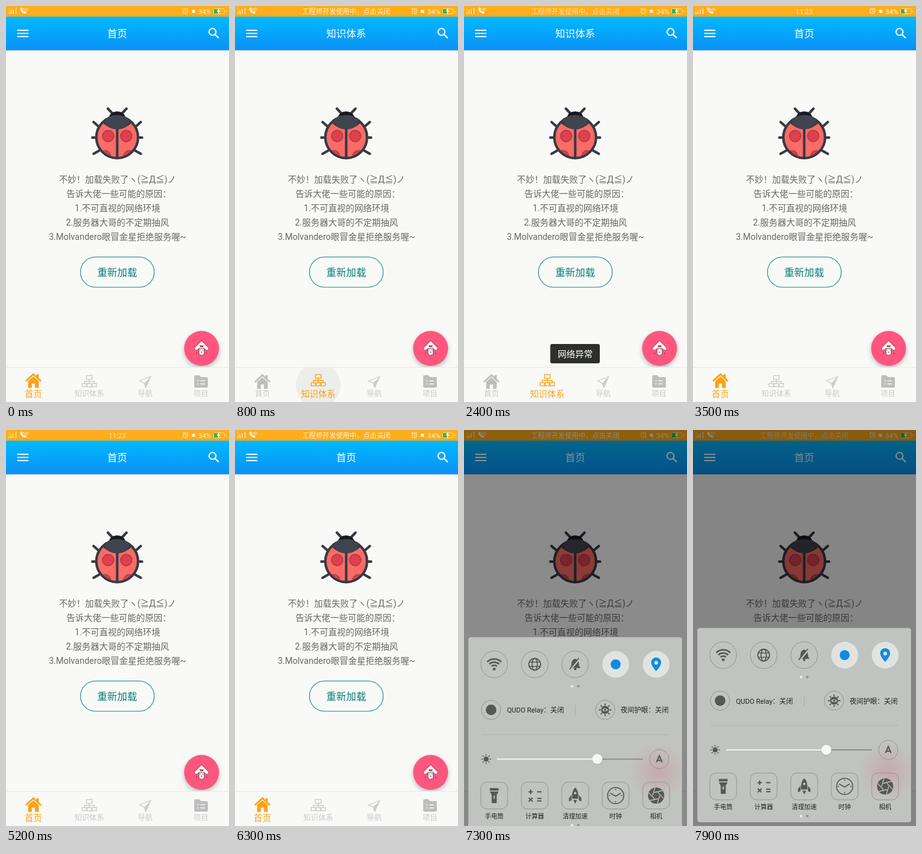
An HTML page with a canvas that plays this animation: 358x635 px, repeating every 8 s.

```html
<!DOCTYPE html>
<html lang="zh-CN">
<head>
<meta charset="utf-8">
<style>
html, body { margin: 0; width: 100%; height: 100%; overflow: hidden; background: #f9faf8; }
canvas { display: block; width: 358px; height: 635px; }
</style>
</head>
<body>
<canvas id="stage"></canvas>
<script>
const W = 358, H = 635, LOOP = 8000;
const FONT = 'Roboto, "Noto Sans CJK SC", "Noto Sans CJK", sans-serif';
const PAGE = '#f9faf8', DARK = '#363a44', INK = '#555855', BLUE = '#0f8be2', PANEL = '#c1c3c0';
const canvas = document.getElementById('stage');
const dpr = window.devicePixelRatio || 1;
canvas.width = W * dpr;
canvas.height = H * dpr;
const c = canvas.getContext('2d');

const clamp = x => Math.min(1, Math.max(0, x));
const ramp = (t, from, to) => clamp((t - from) / (to - from));
const ease = x => x * x * (3 - 2 * x);
const mix = (a, b, k) => `rgb(${a.map((v, i) => Math.round(v + (b[i] - v) * k))})`;

function text(str, x, mid, size, color, align = 'center') {
  c.font = `${size}px ${FONT}`;
  c.textAlign = align;
  c.fillStyle = color;
  c.fillText(str, x, mid + size * 0.37);
}
function at(x, y, draw) {
  c.save();
  c.translate(x, y);
  draw();
  c.restore();
}
function fade(alpha, draw) {
  if (alpha <= 0) return;
  c.save();
  c.globalAlpha = alpha;
  draw();
  c.restore();
}
function rect(x, y, w, h, color) {
  c.fillStyle = color;
  c.fillRect(x, y, w, h);
}
function paint(fill, stroke, width = 1) {
  if (fill) { c.fillStyle = fill; c.fill(); }
  if (stroke) { c.strokeStyle = stroke; c.lineWidth = width; c.stroke(); }
}
function disc(x, y, r, fill, stroke, width) {
  c.beginPath();
  c.arc(x, y, r, 0, 7);
  paint(fill, stroke, width);
}
function box(x, y, w, h, r, fill, stroke, width) {
  c.beginPath();
  c.roundRect(x, y, w, h, r);
  paint(fill, stroke, width);
}
function shape(d, fill, stroke, width = 1) {
  const p = new Path2D(d);
  if (fill) { c.fillStyle = fill; c.fill(p); }
  if (stroke) { c.strokeStyle = stroke; c.lineWidth = width; c.stroke(p); }
}

function statusBar(t) {
  rect(0, 0, W, 17, '#ffad1a');
  const ink = '#fff3dc';
  shape('M5 4v1M5 7v1M5 10v3M8 7v6M11.5 5v8M16 3v10', null, ink, 1.2);
  shape('M23 4q-1 3 3 6t6 2l1-2-3-2-1 1q-2-1-3-3l1-1-2-3z', ink);
  text('HD', 31.5, 6, 6.5, ink);
  disc(288, 8.5, 3.9, null, ink, 1);
  shape('M288 6v3h2M283.5 5l2.5-2M292.5 5l-2.5-2', null, ink, 1);
  rect(298.5, 6, 5, 5, ink);
  text('34%', 319, 8.5, 11, ink);
  box(333.5, 4.5, 17, 8, 2, null, '#ffdc9a', 1);
  rect(334, 5, 6, 7, '#19b866');
  shape('M341 4l-2.5 5h2.5l-1 4 4-5.5h-2.5l1-3.500z', '#fff');
  rect(352, 7.5, 1.5, 2, ink);

  const notice = ramp(t, 300, 800) - ramp(t, 2300, 2700) + ramp(t, 5800, 6300) - ramp(t, 7800, 8200);
  const clock = ramp(t, 3000, 3500) - ramp(t, 5100, 5500);
  fade(notice, () => text('工程师开发使用中，点击关闭', 178.5, 8.5, 10.9, ink));
  fade(clock, () => text('11:23', 178.5, 8.5, 11, ink));
}

function header(title) {
  const g = c.createLinearGradient(0, 17, 0, 71);
  g.addColorStop(0, '#00b9ff');
  g.addColorStop(1, '#0b91f5');
  rect(0, 17, W, 54, g);
  rect(0, 71, W, 1, '#e3e8ec');
  for (const y of [38, 43, 48]) rect(18, y, 18, 2, '#fff');
  disc(331.5, 41.5, 5.5, null, '#fff', 2);
  shape('M335.500 45.500l6 6', null, '#fff', 2.4);
  text(title, 178.5, 44, 16, '#fff');
}

function ladybug() {
  at(178.5, 0, () => {
    c.lineCap = 'round';
    for (const side of [-1, 1]) {
      c.save();
      c.scale(side, 1);
      shape('M6 174L15 164.500M29 194L38 186M35 211h5M29 232l9 5', null, DARK, 4);
      c.restore();
    }
    shape('M-14 180q3-11 14-11t14 11z', '#17191d');
    disc(0, 210.5, 33.5, '#fd6b66');
    c.save();
    c.beginPath();
    c.arc(0, 210.5, 33.5, 0, 7);
    c.clip();
    for (const side of [-1, 1]) {
      disc(side * 14.5, 208.5, 9, '#e23f4c', '#a9414b', 1.8);
      disc(side * 19.5, 241, 9, '#d9424c', '#a9414b', 1.8);
    }
    shape('M-25 186Q-12 198 0 198T25 186L20 174H-20z', DARK);
    c.restore();
    shape('M0 197V243', null, DARK, 4);
    disc(0, 210.5, 33.5, null, DARK, 4);
    shape('M-20 185Q-15 175 0 175T20 185Q14 197 0 197T-20 185z', '#40444e');
  });
}

function errorPage() {
  ladybug();
  const lines = [
    '不妙！加载失败了ヽ(≧Д≦)ノ', '告诉大佬一些可能的原因：', '1.不可直视的网络环境',
    '2.服务器大哥的不定期抽风', '3.Molvandero眼冒金星拒绝服务喔~'
  ];
  lines.forEach((s, i) => text(s, i === 1 ? 181 : 179, 278 + 23 * i, 14, '#666866'));
  box(119.5, 402.5, 118.5, 48.5, 24.25, null, '#148a84', 1.1);
  text('重新加载', 178.5, 427, 16, '#087f78');
}

function fab() {
  c.save();
  c.shadowColor = 'rgba(0,0,0,.28)';
  c.shadowBlur = 7 * dpr;
  c.shadowOffsetY = 3 * dpr;
  disc(314, 549, 28, '#ff5680');
  c.restore();
  at(314, 549, () => {
    c.lineJoin = 'round';
    shape('M-4 0h8v9q-4 4-8 0z', '#fff', '#5b4a50', 0.8);
    shape('M0-12L11-1q1 4-3 4l-4-3h-8l-4 3q-4 0-3-4z', '#fff', '#6b5058', 0.8);
    rect(-3, -5, 6, 3, '#d94c4c');
    shape('M-2 2v1M2 2v1M-1.500 6h3', null, '#4a3c40', 1.1);
    disc(-8, 8, 1, '#a52f50');
    disc(8, 8, 1, '#a52f50');
  });
}

const tabIcons = [
  color => {
    shape('M-12 1L0-10 12 1', null, color, 2.8);
    shape('M-8.500 1L0-6.500 8.500 1V12H2.500V5h-5v7h-6z', color);
    rect(5, -10, 3.5, 6, color);
  },
  color => {
    c.strokeStyle = color;
    c.lineWidth = 1.3;
    c.strokeRect(-4.5, -9.5, 9, 6);
    for (const x of [-11.5, -3.5, 4.5]) c.strokeRect(x, 3.5, 7, 5);
    shape('M0-3.500V3.500M-8 3.500V0H8V3.500', null, color, 1.3);
  },
  color => {
    shape('M-9-1L9-8 1 10-1.500 3z', null, color, 1.2);
    shape('M9-8L-1.500 3 1 10z', color);
  },
  color => {
    shape('M-11-8q0-2 2-2h6l3 3h9q2 0 2 2V8q0 2-2 2H-9q-2 0-2-2z', color);
    shape('M-6-1h2M-1-1h7M-6 4h2M-1 4h7', null, '#f6f6f5', 1.6);
  }
];

function navBar(t, tree) {
  rect(0, 579, W, 1, '#e9eae8');
  rect(0, 580, W, 55, '#f9f9f8');
  c.save();
  c.beginPath();
  c.rect(0, 580, W, 55);
  c.clip();
  for (const [x, tap] of [[133.5, 450], [44, 2650]]) {
    const alpha = ramp(t, tap, tap + 100) * (1 - ramp(t, tap + 250, tap + 750));
    fade(alpha * 0.06, () => disc(x, 608, 12 + 24 * ease(ramp(t, tap, tap + 300)), '#000'));
  }
  c.restore();
  ['首页', '知识体系', '导航', '项目'].forEach((name, i) => {
    const on = [1 - tree, tree, 0, 0][i];
    const x = 44 + 89.7 * i;
    const orange = [250, 162, 24];
    const grey = i === 0 || i === 3 ? 190 : 203;
    at(x, 602 - 1.5 * on, () => tabIcons[i](mix([grey, grey, grey], orange, on)));
    text(name, x, 622 - 0.5 * on, 12 + 1.9 * on, mix([200, 200, 200], orange, on));
  });
}

function toast(t) {
  fade(ramp(t, 950, 1300) - ramp(t, 2850, 3200), () => {
    box(138.5, 542, 79.5, 31, 3, '#2d2f2d');
    text('网络异常', 178.5, 558, 14, '#fff');
  });
}

const toggles = [
  () => {
    disc(0, 7.5, 2.3, INK);
    for (const r of [6, 11, 16]) {
      c.beginPath();
      c.arc(0, 7.5, r, -Math.PI * 0.75, -Math.PI * 0.25);
      paint(null, INK, 2.6);
    }
  },
  () => {
    disc(0, 0, 9.5, null, INK, 1.8);
    c.beginPath();
    c.ellipse(0, 0, 4.2, 9.5, 0, 0, 7);
    paint(null, INK, 1.6);
    shape('M-9-3.500H9M-9 3.500H9', null, INK, 1.6);
  },
  () => {
    shape('M-9 6q3-2 3-7Q-6-7 0-9 6-7 6-1q0 5 3 7z', INK);
    disc(0, 7.5, 2, INK);
    shape('M-8 9L7-9', null, PANEL, 3);
    shape('M-9 8L6-10', null, INK, 1.5);
  },
  () => disc(0, 0, 8, BLUE),
  () => {
    shape('M0 11Q-8 2-8-3A8 8 0 0 1 8-3Q8 2 0 11z', BLUE);
    disc(0, -2.5, 3, '#e1e3e0');
  }
];

const apps = [
  ['手电筒', () => {
    rect(-7, -12, 14, 4, INK);
    shape('M-7-6.500H7L4-1V12H-4V-1z', INK);
    rect(-1, 0, 2, 5, PANEL);
  }],
  ['计算器', () => shape(
    'M-10-6h7M-6.500-9.500v7M4-6h7M-9.500 3.500l6 6M-3.500 3.500l-6 6M4 4.500h7M4 8.500h7', null, INK, 2)],
  ['清理加速', () => {
    shape('M0-13Q6-8 5 5H-5Q-6-8 0-13zM-6-1v9l-4 1V4zM6-1v9l4 1V4zM-3 7H3L0 13z', INK);
    disc(0, -4, 2, PANEL);
  }],
  ['时钟', () => {
    disc(0, 0, 13, null, INK, 1.6);
    shape('M-9-4L0 1 8-4M0-11v2M0 9v2M-11 0h2M9 0h2', null, INK, 1.6);
  }],
  ['相机', () => {
    disc(0, 0, 13, INK);
    for (let i = 0; i < 6; i++) {
      c.rotate(Math.PI / 3);
      shape('M-3-5L10-8', null, PANEL, 1.3);
    }
  }]
];

function sunRays(r1, r2, color, width) {
  c.beginPath();
  for (let i = 0; i < 8; i++) {
    const a = i * Math.PI / 4;
    c.moveTo(r1 * Math.cos(a), r1 * Math.sin(a));
    c.lineTo(r2 * Math.cos(a), r2 * Math.sin(a));
  }
  paint(null, color, width);
}

function pageDots(y) {
  disc(173.5, y, 2, '#f3f4f2');
  disc(183.5, y, 2, '#8d908d');
}

function panel(top) {
  const line = '#939693', label = '#222422';
  c.save();
  box(7, top, 343, 311.5, 4, PANEL);
  c.clip();
  const glow = c.createRadialGradient(312, 548, 8, 312, 548, 46);
  glow.addColorStop(0, 'rgba(205,135,145,.34)');
  glow.addColorStop(1, 'rgba(205,135,145,0)');
  rect(260, 495, 98, 110, glow);
  c.translate(0, top - 317.5);
  c.lineCap = 'butt';

  toggles.forEach((icon, i) => at(48.5 + 65 * i, 361, () => {
    disc(0, 0, 21.5, i > 2 ? '#e1e3e0' : null, i > 2 ? null : line, 1);
    icon();
  }));
  pageDots(396);

  disc(43.5, 434, 15.5, null, line, 1);
  disc(43.5, 434, 8.5, INK);
  text('QUDO Relay：关闭', 69, 434.5, 11, label, 'left');
  rect(178, 426, 1, 17, '#a9aca9');
  at(226.5, 434, () => {
    disc(0, 0, 15.5, null, line, 1);
    sunRays(7, 10, INK, 1.8);
    disc(0, 0, 6.5, INK);
    shape('M-5 0Q0-5 5 0 0 5-5 0z', PANEL);
    disc(0, 0, 1.8, INK);
  });
  text('夜间护眼：关闭', 251.5, 434.5, 11, label, 'left');
  rect(28, 473.500, 301, 1, '#adb0ad');

  at(35.5, 513, () => {
    disc(0, 0, 4, INK);
    sunRays(5.5, 7.8, INK, 1.5);
  });
  rect(53, 512, 161, 2, '#f2f3f1');
  rect(214, 512, 73, 2, '#8e918e');
  disc(214, 514, 8.5, 'rgba(0,0,0,.12)');
  disc(214, 513, 8, '#f8f9f7');
  disc(313.5, 513, 15.5, null, line, 1);
  shape('M309 518l4.500-10.500 4.500 10.500M310.500 515h6', null, INK, 2);

  apps.forEach(([name, icon], i) => {
    const x = 48.5 + 65 * i;
    box(x - 21.5, 550, 43, 43, 10, null, line, 1);
    at(x, 571.5, icon);
    text(name, x, 604.5, 10, label);
  });
  pageDots(619);
  c.restore();
}

function draw(t) {
  c.setTransform(dpr, 0, 0, dpr, 0, 0);
  c.lineCap = 'butt';
  c.lineJoin = 'miter';
  rect(0, 0, W, H, PAGE);
  const tree = ease(ramp(t, 500, 700)) - ease(ramp(t, 2700, 2900));
  statusBar(t);
  header(t >= 600 && t < 2800 ? '知识体系' : '首页');
  c.save();
  errorPage();
  c.restore();
  fab();
  navBar(t, tree);
  toast(t);
  if (t > 7100) {
    const rest = t < 7500 ? Math.exp((7100 - t) / 65.5) : 0;
    rect(0, 0, W, H, `rgba(0,0,0,${0.47 * (1 - rest)})`);
    panel(317.5 + 317.5 * rest);
  }
}

function tick(now) {
  draw(now % LOOP);
  requestAnimationFrame(tick);
}
draw(0);
requestAnimationFrame(tick);
</script>
</body>
</html>
```
